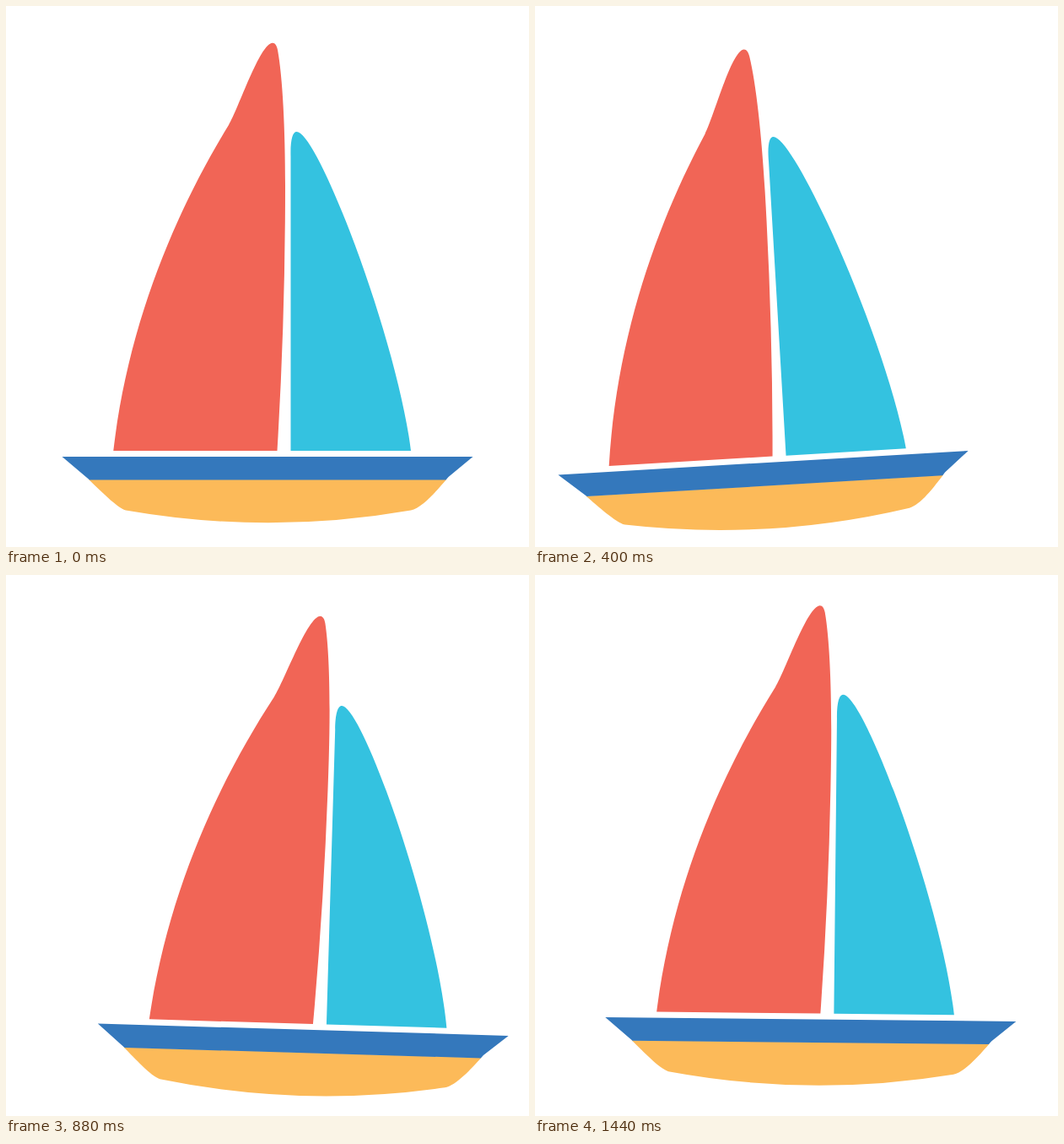
Animation of 620x641 px, one loop 1520 ms. Source, as an HTML page:

```html
<!DOCTYPE html>
<html lang="en">
<head>
<meta charset="utf-8">
<title>Rocking sailboat</title>
<style>
  html, body { margin: 0; width: 100%; height: 100%; overflow: hidden; background: #fff; }
  svg { display: block; width: 620px; height: 641px; }
</style>
</head>
<body>
<svg viewBox="0 0 620 641">
  <g id="boat">
    <path fill="#f16556" d="M127.3 527C145 375 201 244 264 141C276 121 301 44 316 43.7C319 43.7 321 47 322 52C328 85 331 145 331 213Q331 370 321.5 527Z"/>
    <path fill="#34c2e0" d="M337.5 527V178C337 158 340 149 344.5 149C370 149 464 396 480 527Z"/>
    <path fill="#fcba59" d="M98 561H522C511 574 493 595 480 597.5Q311 627 142 597.5C131 594 112 574 98 561Z"/>
    <path fill="#3478bc" d="M66.5 534H553.5L524.5 558L521.5 561.5H99Z"/>
  </g>
</svg>
<script>
const STEP = 80, STEPS = 19;
const boat = document.getElementById('boat');

// The boat glides linearly between these poses: offset from rest, tilt in degrees.
const rest = { at: 0, x: 0, y: 0, tilt: 0 };
const swungLeft = { at: 4, x: -76.8, y: 6.8, tilt: -5.27 };
const dipped = { at: 9, x: 46.8, y: 11.1, tilt: 4.24 };
const swungRight = { at: 15, x: 52, y: -7.8, tilt: -3.42 };
const returning = { at: 18, x: 19, y: -7.6, tilt: 0.59 };
const poses = [rest, swungLeft, dipped, swungRight, returning];

function draw(time) {
  const step = Math.floor(time / STEP) % STEPS;
  const next = poses.findIndex(pose => pose.at > step);
  const [from, to] = poses.slice(next < 0 ? -2 : next - 1);
  const mix = (step - from.at) / (to.at - from.at);
  const blend = key => from[key] + (to[key] - from[key]) * mix;
  boat.setAttribute('transform',
    `translate(${blend('x')} ${blend('y')}) rotate(${blend('tilt')} 309.5 320)`);
}

const start = performance.now();
function tick() {
  draw(performance.now() - start);
  requestAnimationFrame(tick);
}
tick();
</script>
</body>
</html>
```
